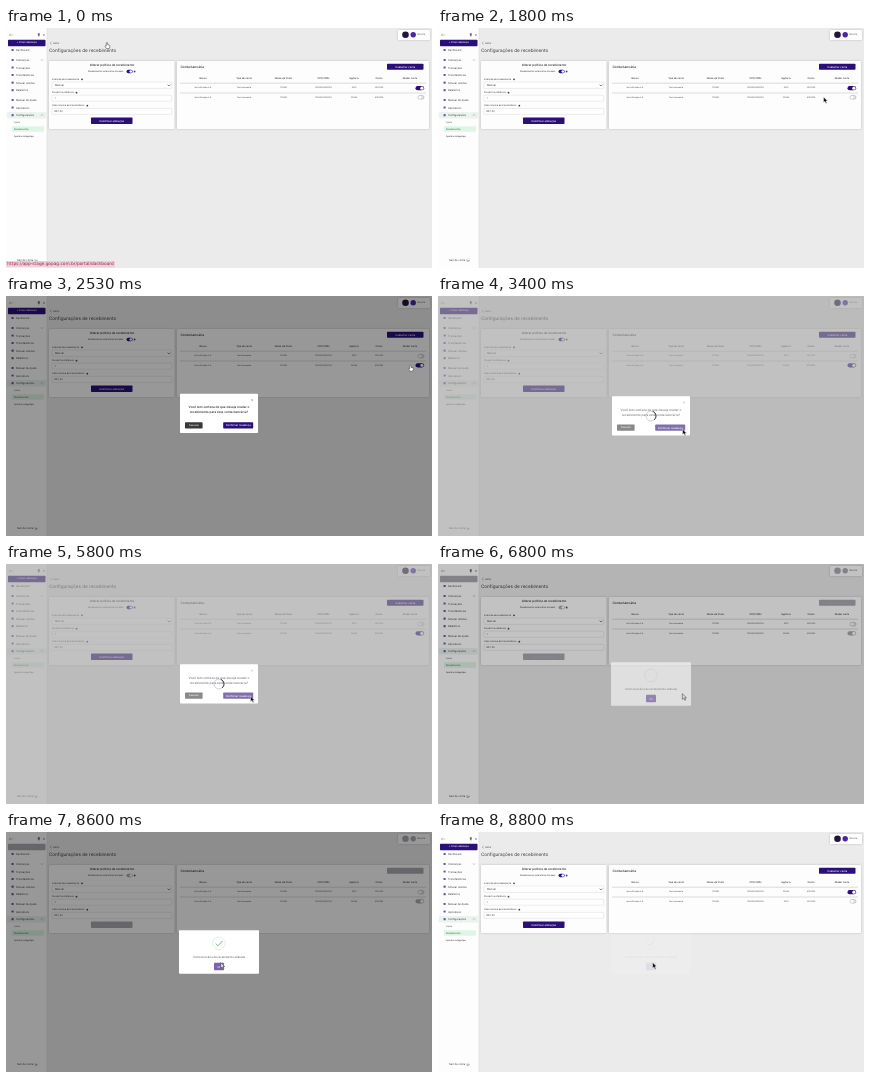
An HTML page for the animation above (8.87 s loop, 426 px wide and 240 px high).

```html
<!DOCTYPE html>
<html lang="pt-BR">
<head>
<meta charset="utf-8">
<title>Configurações de recebimento</title>
<style>
html, body { margin: 0; width: 100%; height: 100%; overflow: hidden; background: #ebebeb; }
svg { display: block; width: 100vw; height: 100vh; }
text { font-family: Inter, "Open Sans", sans-serif; dominant-baseline: central; text-rendering: geometricPrecision; }
.panel { filter: drop-shadow(0 .5px 1.2px rgba(0, 0, 0, .2)); }
.muted .btn { fill: #aaa9b0; }
.muted .btnText { opacity: .1; }
.muted #arrow { fill: #ddd; stroke: #222; }
</style>
</head>
<body>
<svg id="stage" viewBox="0 0 426 240" xmlns="http://www.w3.org/2000/svg">
  <g id="page"></g>
  <rect id="shade" width="426" height="240" fill="#000"/>
  <g id="ask"></g>
  <g id="loader">
    <rect width="426" height="240" fill="#fff" opacity=".4"/>
    <circle cx="213" cy="120" r="5" fill="none" stroke="#bcbcc4" stroke-width=".7"/>
    <path id="arc" d="M215.5 115.7A5 5 0 0 1 215.5 124.3" fill="none" stroke="#2b2840" stroke-width=".9"/>
  </g>
  <g id="done"></g>
  <g id="status">
    <rect y="233" width="109" height="6.4" fill="#ead0d8"/>
    <text x="1.3" y="236.3" font-size="4.3" fill="#a3264f" style="font-family:'DejaVu Sans',sans-serif">https://app-stage.gopag.com.br/portal/dashboard</text>
  </g>
  <path id="arrow" d="M0 0V5.6L1.4 4.4L2.4 6.6L3.4 6.1L2.4 4H4.2Z" fill="#111" stroke="#fff" stroke-width=".45"/>
  <path id="hand" d="M-.7 3V.3Q0-.5.6.3V2.2L2.6 2.7Q3 3 2.8 4L2.3 6H-.6L-2 3.7Q-1.8 2.8-.7 3.6Z" fill="#fff" stroke="#333" stroke-width=".5"/>
</svg>
<script>
const LOOP = 8870, STEP = 200 / 3;
const PURPLE = '#2b0f78', INK = '#38363d';
const $ = id => document.getElementById(id);

const text = (s, x, y, size, o = {}) =>
  `<text x="${x}" y="${y}" font-size="${size}" fill="${o.fill || INK}" font-weight="${o.weight || 400}"` +
  ` text-anchor="${o.mid ? 'middle' : 'start'}" class="${o.cls || ''}">${s}</text>`;
const rect = (x, y, w, h, fill, r = 0, more = '') =>
  `<rect x="${x}" y="${y}" width="${w}" height="${h}" rx="${r}" fill="${fill}" ${more}/>`;
const line = (d, color = INK, w = .4, more = '') =>
  `<path d="${d}" fill="none" stroke="${color}" stroke-width="${w}" ${more}/>`;
const dot = (x, y, r, fill, cls = '') => `<circle cx="${x}" cy="${y}" r="${r}" fill="${fill}" class="${cls}"/>`;
const panel = (x, y, w, h) => rect(x, y, w, h, '#fdfdfd', .8, 'class="panel"');
const button = (s, x, y, w, h, size, fill = PURPLE) =>
  rect(x, y, w, h, fill, .7, 'class="btn"') +
  text(s, x + w / 2, y + h / 2, size, { fill: '#fff', mid: 1, weight: 500, cls: 'btnText' });

function toggle(id, y) {
  return `<g id="${id}On">${rect(409.5, y - 2.1, 8.6, 4.2, PURPLE, 2.1, 'class="btn"')}${dot(415.9, y, 1.6, '#fff')}</g>` +
    `<g id="${id}Off">${rect(412, y - 1.8, 6, 3.6, '#e4e4e6', 1.8, 'stroke="#8b8b90" stroke-width=".4"')}${dot(413.9, y, 1.4, '#fff')}</g>`;
}

function sidebar() {
  const items = [['Dashboard', 22], ['Cobranças', 32], ['Transações', 39.5], ['Transferências', 47],
    ['Simular vendas', 54.7], ['Relatórios', 62.2], ['Manual de Ajuda', 72], ['Aplicativos', 79.5], ['Configurações', 87.2]];
  let s = rect(0, 0, 41, 240, '#fdfdfd') + line('M41 0V240', '#d5d5d8', .5);
  s += line('M3.3 7H7.2M4.5 6L3.3 7L4.5 8', '#777');
  s += rect(31.8, 5, 2, 3, '#77738c', .8) + line('M32.8 8V9.3', '#77738c') + line('M37.2 7H38.6', PURPLE, .8);
  s += button('+ Criar cobrança', 2, 11.7, 37.5, 6.5, 2.5);
  s += rect(1, 84, 39, 6.5, '#eaf3ed', .6);
  for (const [name, y] of items)
    s += rect(5.5, y - 1.1, 2.2, 2.2, '#6c5aa5', .6) + text(name, 10, y, 2.6);
  s += line('M35 31.5L36 32.5L37 31.5M35 87.5L36 86.5L37 87.5', '#555');
  s += rect(6, 98.3, 32, 5.5, '#dff5e5', .6);
  s += text('Conta', 8, 94.6, 2.1) + text('Recebimento', 8, 101.1, 2.35, { fill: '#2c6c48' }) + text('Aparência/logotipo', 8, 108.4, 2.2);
  return s + text('Sair da conta', 11, 232.3, 2.6) + line('M29 231.3V233.3H31M29.7 232.3H32', INK, .35);
}

function policy() {
  const info = (x, y) => dot(x, y, .9, '#46434f');
  const field = (y, h) => rect(46, y, 119.7, h, '#fff', .6, 'stroke="#cfcfd3" stroke-width=".4"');
  return panel(43, 33, 125.5, 68) +
    text('Alterar política de recebimento', 106, 37.3, 3, { mid: 1, weight: 600 }) +
    text('Recebimento automático ativado:', 82, 43.6, 2.25) +
    rect(120.5, 41.7, 6.2, 3.6, PURPLE, 1.8, 'class="btn"') + dot(124.8, 43.5, 1.35, '#fff') + info(128.6, 43.5) +
    text('Intervalo de recebimento', 46, 51.3, 2.3) + info(76, 51.3) +
    field(54, 6.4) + text('Mensal', 49, 57.3, 2.6) + line('M161.6 56.7L163 58L164.4 56.7', INK, .6) +
    text('Dia de transferência', 46, 64.7, 2.3) + info(70.5, 64.7) +
    field(67.2, 6) + text('1', 48.5, 70.3, 2.4) +
    text('Valor mínimo de transferência', 46, 77.7, 2.3) + info(81.3, 77.7) +
    field(80.4, 6) + text('R$ 1,00', 48.5, 83.5, 2.4) +
    button('Confirmar alteração', 85, 89.5, 41.5, 6.4, 2.6);
}

function accounts() {
  const cols = [197, 238, 277.5, 317.5, 348, 373];
  const heads = ['Banco', 'Tipo de conta', 'Nome do titular', 'CPF/CNPJ', 'Agência', 'Conta'];
  const row = (y, id) => ['Sol Instituição S.A.', 'Conta corrente', 'TEVOR', '10000200000103']
    .map((s, i) => text(s, cols[i], y, 2, { mid: 1 })).join('') +
    `<text id="${id}Ag" x="348" y="${y}" font-size="2" fill="${INK}" text-anchor="middle"/>` +
    `<text id="${id}Ac" x="373" y="${y}" font-size="2" fill="${INK}" text-anchor="middle"/>` + toggle(id, y - .2);
  return panel(171, 33, 252, 68) +
    text('Conta bancária', 174.5, 38.8, 3.2, { weight: 600 }) +
    button('Cadastrar conta', 381, 35.8, 36.5, 6, 2.6) +
    heads.map((s, i) => text(s, cols[i], 50, 2.4, { mid: 1, weight: 500 })).join('') +
    text('Mudar conta', 404, 50, 2.4, { mid: 1, weight: 500 }) +
    line('M174 55.2H420M174 65H420', '#a5a5aa', .4) + row(60.4, 'a') + row(69.5, 'b');
}

$('page').innerHTML = rect(0, 0, 426, 240, '#ebebeb') + sidebar() +
  line('M45.5 14L44.4 15.1L45.5 16.2') + text('Voltar', 47, 15.1, 2.3) +
  text('Configurações de recebimento', 43, 23.3, 4.6) +
  panel(392, 2, 32, 10) + dot(399.5, 6.7, 3.3, '#21123f', 'btn') + dot(407.2, 6.7, 2.7, '#4b24a5', 'btn') +
  text('Renato', 411.3, 6.8, 2.4, { fill: '#666' }) + policy() + accounts();

$('ask').innerHTML = rect(174, 100.2, 78, 39.2, '#fff', .8) +
  line('M245.4 105.8L246.8 107.2M246.8 105.8L245.4 107.2') +
  text('Você tem certeza de que deseja mudar o', 213, 113.8, 3.1, { mid: 1, weight: 600 }) +
  text('recebimento para esta conta bancária?', 213, 118.5, 3.1, { mid: 1, weight: 600 }) +
  button('Cancelar', 179, 128.6, 17.6, 6.2, 2.4, '#3b393c') +
  button('Confirmar mudança', 217.2, 128.6, 30, 6.2, 2.65);

$('done').innerHTML = rect(173, 98.2, 80, 43.5, '#fff', .8) +
  `<circle cx="213" cy="111.3" r="6.3" fill="none" stroke="#d5ead4" stroke-width=".7"/>` +
  line('M209.8 111.6L212 113.8L216.5 109', '#74b978', 1, 'id="check" pathLength="1" stroke-dasharray="1 1"') +
  text('Conta bancária de recebimento alterada', 213, 124.5, 2.75, { mid: 1, fill: '#555' }) +
  rect(208, 130.8, 10, 7.5, '#7e62b2', .7) + text('OK', 213, 134.6, 2.6, { mid: 1, fill: '#fff' });

const ramp = (t, a, b) => Math.max(0, Math.min(1, (t - a) / (b - a)));
const ease = p => p * p * (3 - 2 * p);
const show = (id, on) => $(id).setAttribute('visibility', on ? 'visible' : 'hidden');

// time, x, y of the pointer tip
const path = [[600, 101, 14.5], [1000, 210, 38], [1270, 210, 38], [1800, 385.5, 69], [2200, 404.5, 69.2],
  [2580, 404.5, 69.2], [3070, 244.5, 133.2], [4300, 244.5, 133.2], [4500, 244.5, 132.2],
  [5930, 244.5, 132.2], [6400, 244.3, 129.7], [7800, 244.3, 129.7], [8500, 214.6, 130.6]];

function pointer(t) {
  let [, x, y] = path[0];
  for (let i = 1; i < path.length; i++) {
    const a = path[i - 1], b = path[i], p = ease(ramp(t, a[0], b[0]));
    x += (b[1] - a[1]) * p;
    y += (b[2] - a[2]) * p;
  }
  return `translate(${x} ${y})`;
}

function setRow(id, on, [agency, account]) {
  show(id + 'On', on);
  show(id + 'Off', !on);
  $(id + 'Ag').textContent = agency;
  $(id + 'Ac').textContent = account;
}

function draw(ms) {
  // times are rounded to 10 ms, so allow for that when snapping to a step
  const t = Math.floor((ms % LOOP + 6) / STEP) * STEP;
  const askIn = ramp(t, 2260, 2500) * (1 - ramp(t, 6430, 6640));
  const doneIn = ramp(t, 6660, 6900) * (1 - ramp(t, 8660, 8815));

  const swapped = t > 8700;
  const second = t > 2190 && !swapped;
  const rows = [['0001', '3003100'], ['00828', '8128958']];
  if (swapped) rows.reverse();
  setRow('a', !second, rows[0]);
  setRow('b', second, rows[1]);

  $('stage').setAttribute('class', t > 6660 && !swapped ? 'muted' : '');
  $('shade').setAttribute('opacity', .4 * (swapped && doneIn < .2 ? 0 : Math.max(askIn, doneIn)));
  $('ask').setAttribute('opacity', askIn);
  $('ask').setAttribute('transform', `translate(0 ${-10 * (1 - ease(ramp(t, 2260, 2660)))})`);
  show('loader', t >= 3190 && t < 6430);
  $('loader').setAttribute('opacity', ramp(t, 3130, 3330));
  $('arc').setAttribute('transform', `rotate(${(t - 3420) / 800 * 360} 213 120)`);
  $('done').setAttribute('opacity', doneIn);
  $('check').setAttribute('stroke-dashoffset', 1 - ease(ramp(t, 6860, 7300)));

  show('status', t < 1260);
  const hand = t < 1000 || (t > 2100 && t < 2650);
  show('hand', hand);
  show('arrow', !hand);
  $(hand ? 'hand' : 'arrow').setAttribute('transform', pointer(t));
}

function tick() {
  draw(performance.now());
  requestAnimationFrame(tick);
}
tick();
</script>
</body>
</html>
```
